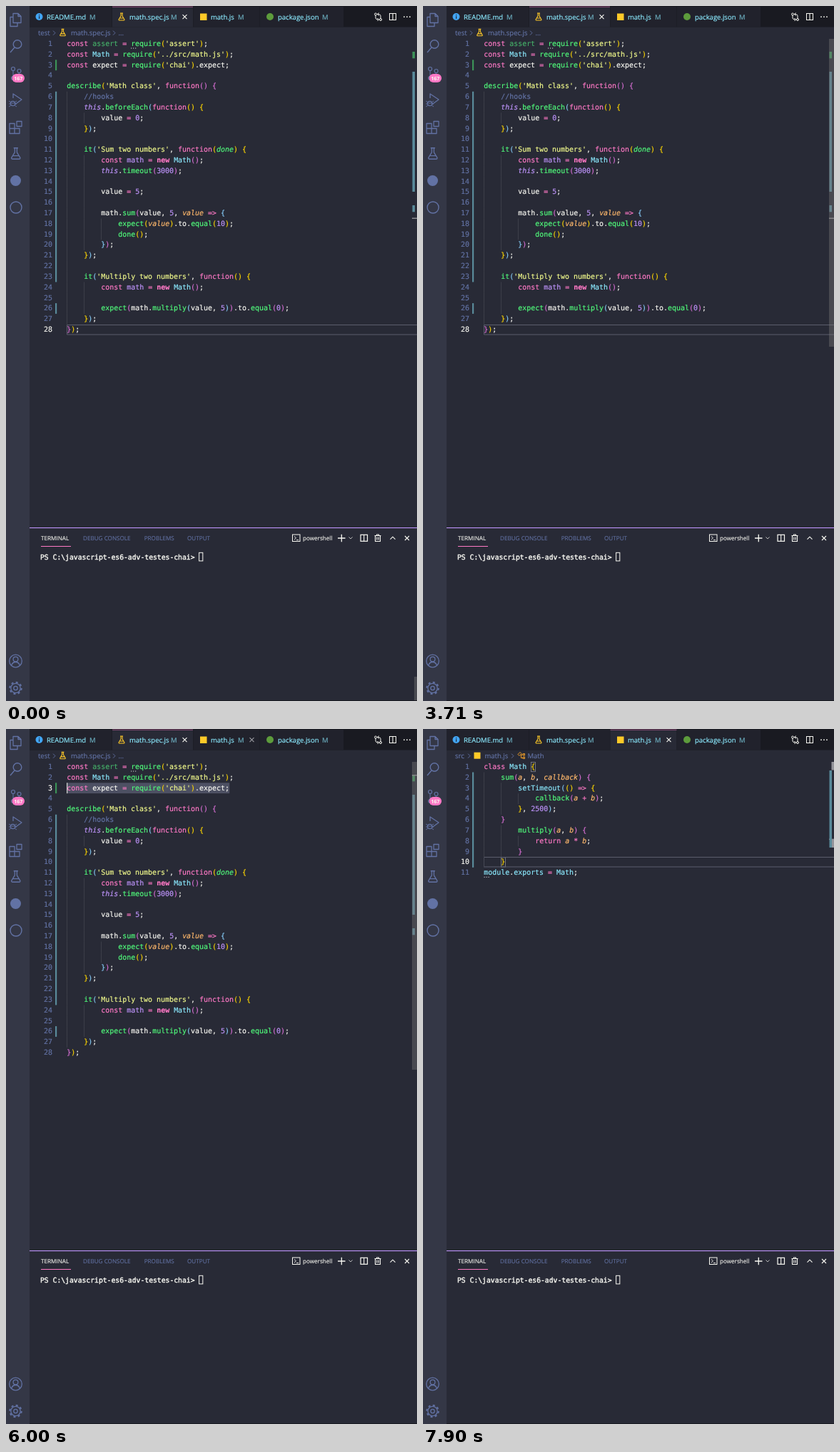
Animation, 576 px wide and 973 px high, one loop 8000 ms. Source, as an HTML page:

```html
<!DOCTYPE html>
<html lang="en">
<head>
<meta charset="utf-8">
<title>Editor session</title>
<style>
html, body { margin: 0; width: 100%; height: 100%; overflow: hidden; background: #282a36; }
svg { display: block; width: 576px; height: 973px; }
text { white-space: pre; fill: currentColor; stroke: currentColor; stroke-width: .18px; text-rendering: geometricPrecision; }
tspan { fill: currentColor; stroke: currentColor; }
.code { font: 9.966px "DejaVu Sans Mono", monospace; }
.term { font: 9.73px "DejaVu Sans Mono", monospace; stroke-width: .4px; }
.ui { font: 9.5px "Open Sans", sans-serif; }
.small { font: 8.13px "Open Sans", sans-serif; stroke-width: .1px; }
.tiny { font: bold 7px "Open Sans", sans-serif; stroke-width: 0; }
.i { font-style: italic; }
.b { font-weight: bold; }
</style>
</head>
<body>
<svg id="stage" viewBox="0 0 576 973"></svg>
<script>
const C = {
  fg: '#f8f8f2', muted: '#6272a4', pink: '#ff79c6', green: '#50fa7b', cyan: '#8be9fd',
  purple: '#bd93f9', yellow: '#f1fa8c', orange: '#ffb86c', amber: '#ffca28',
  bg: '#282a36', dark: '#191a21', tab: '#21222c', side: '#343746',
  changed: '#598a9a', added: '#3c9258', guide: '#42444f', edge: '#5b5d6c', slider: '#797979'
};
const BRACKETS = ['#ffd700', '#da70d6', '#87cefa'];
const DURATION = 8000, LEFT = 85.2, CHAR = 6, ROW = 14.815, TOP = 45.7;

const specSource = `const assert = require('assert');
const Math = require('../src/math.js');
const expect = require('chai').expect;

describe('Math class', function() {
    //hooks
    this.beforeEach(function() {
        value = 0;
    });

    it('Sum two numbers', function(done) {
        const math = new Math();
        this.timeout(3000);

        value = 5;

        math.sum(value, 5, value => {
            expect(value).to.equal(10);
            done();
        });
    });

    it('Multiply two numbers', function() {
        const math = new Math();

        expect(math.multiply(value, 5)).to.equal(0);
    });
});`;
const mathSource = `class Math {
    sum(a, b, callback) {
        setTimeout(() => {
            callback(a + b);
        }, 2500);
    }
        multiply(a, b) {
            return a * b;
        }
    }
module.exports = Math;`;

// Markup helpers
const rect = (x, y, w, h, fill, more = '') => `<rect x="${x}" y="${y}" width="${w}" height="${h}" fill="${fill}" ${more}/>`;
const box = (x, y, w, h, color, width = 1) => rect(x, y, w, h, 'none', `stroke="${color}" stroke-width="${width}"`);
const disc = (x, y, r, fill) => `<circle cx="${x}" cy="${y}" r="${r}" fill="${fill}"/>`;
const ring = (x, y, r, color, width = 1.2, dash = '') =>
  `<circle cx="${x}" cy="${y}" r="${r}" fill="none" stroke="${color}" stroke-width="${width}" stroke-dasharray="${dash}"/>`;
const path = (d, color, width = 1.1, fill = 'none') =>
  `<path d="${d}" fill="${fill}" stroke="${color}" stroke-width="${width}" stroke-linejoin="round"/>`;
const text = (x, y, s, color, cls = 'ui', more = '') => `<text x="${x}" y="${y}" class="${cls}" color="${color}" ${more}>${s}</text>`;
const group = (id, ...parts) => `<g id="${id}">${parts.join('')}</g>`;
const cross = (x, y, color = C.fg) => path(`M${x - 3} ${y - 3}l6 6m0-6l-6 6`, color);
const chevronRight = (x, y) => path(`M${x - 1.5} ${y - 3}l3 3l-3 3`, C.muted, .9);
const chevronDown = (x, y, r = 3) => path(`M${x - r} ${y - r / 2}l${r} ${r}l${r} ${-r}`, '#c5c5c5', 1);
const flask = (x, y, k, color, width) =>
  path(`M${x - 2 * k} ${y - 5 * k}h${4 * k}m${-k} 0v${4 * k}l${3 * k} ${5 * k}q0 ${k} ${-k} ${k}h${-6 * k}q${-k} 0 ${-k} ${-k}l${3 * k} ${-5 * k}v${-4 * k}M${x - 2.5 * k} ${y + 2 * k}h${5 * k}`, color, width);
const rowTop = n => TOP + (n - 1) * ROW;
const baseline = n => 56 + (n - 1) * ROW;

// Syntax colours
function wordStyle(word, before, after) {
  if (/^(const|function|class|return)$/.test(word)) return [C.pink];
  if (word === 'new') return [C.pink, 'b'];
  if (word === 'this') return [C.purple, 'i'];
  if (/^\d/.test(word)) return [C.purple];
  if (/^(Math|setTimeout|module|exports)$/.test(word)) return [C.cyan];
  if (after[0] === '(') return [C.green];
  if (before.endsWith('function(')) return [C.green, 'i'];
  if (/^(a|b|callback)$/.test(word)) return [C.orange, 'i'];
  if (word === 'value' && (after.startsWith(' =>') || before.endsWith('expect('))) return [C.orange, 'i'];
  if (before.endsWith('const ')) {
    if (word === 'assert') return ['#45ad68'];
    if (word === 'math') return [C.purple];
  }
  return [C.fg];
}

function codeLines(source) {
  let depth = 0;
  const lines = source.split('\n');
  const indentOf = n => lines[n].search(/\S/);
  return lines.map((line, n) => {
    const indent = line ? indentOf(n) : indentOf(n + 1);
    let out = '';
    for (let level = 0; level < indent; level += 4)
      out += rect(LEFT + level * CHAR, rowTop(n + 1), .8, ROW + .1, C.guide);
    const spans = line.trim().replace(/\/\/.*|'[^']*'|\w+|=>|[^\w\s]|\s+/g, (token, at, all) => {
      let style = [C.fg];
      if (token.startsWith('//')) style = [C.muted];
      else if (token[0] === "'") style = [C.yellow];
      else if (/\w/.test(token)) style = wordStyle(token, all.slice(0, at), all.slice(at + token.length));
      else if (/[({]/.test(token)) style = [BRACKETS[depth++ % 3]];
      else if (/[)}]/.test(token)) style = [BRACKETS[--depth % 3]];
      else if (/[=+*]/.test(token)) style = [C.pink];
      else if (!token.trim()) return token;
      return `<tspan color="${style[0]}" class="${style[1] || ''}">${token}</tspan>`;
    });
    return out + text(LEFT + indent * CHAR, baseline(n + 1), spans, C.fg, 'code') + lineNumber(n + 1, C.muted);
  }).join('');
}

const lineNumber = (n, color) => text(65, baseline(n), n, color, 'code', 'text-anchor="end"');
const activeNumber = n => rect(50, rowTop(n) + 1, 16, ROW - 2, C.bg) + lineNumber(n, C.fg);
const gutterBar = (from, to, color) => rect(69, rowTop(from), 2.2, (to - from + 1) * ROW, color);
const hintDots = (x, y) => [0, 3, 6].map(d => rect(x + d, y, 1.2, 1.2, '#b9bac0')).join('');
const lineBox = n => path(`M576 ${Math.round(rowTop(n)) + .5}H85.5v13.5H576`, C.edge, 1);
const bracketBox = (col, n) => box(LEFT + col * CHAR + .3, rowTop(n) + .8, CHAR, 13.2, '#85878f', .8);

// Window chrome
function activityBar() {
  const m = C.muted;
  return rect(0, 0, 33, 973, C.side)
    + path('M10 10.5h7l4 4v9h-11zM10 15.5h-4v13h10v-5M17 10.5v4h4', m, 1.3)
    + ring(16, 53.5, 5.8, m, 1.4) + path('M12 58l-6 7', m, 1.4)
    + ring(10, 88, 2.5, m) + ring(18.5, 91, 2.5, m) + ring(10, 101, 2.5, m) + path('M10 90.5v8M18.5 93.5q0 4-8 4', m)
    + rect(8.5, 95, 17.5, 12, C.pink, 'rx="6"') + text(17.2, 103.6, '167', C.fg, 'tiny', 'text-anchor="middle"')
    + path('M10 129v-6l12 8l-9 6.500', m, 1.3) + ring(9.5, 136.5, 3.2, m)
    + path('M4 133l3 2M4 137h2.5M4 141l3-2M15 133l-3 2M15 137h-2.5M15 141l-3-2M6.500 136h6', m, .9)
    + path('M5 164.500h7v7h7v7h-14zM5 171.500h7v7M15 161.500h7v7h-7z', m, 1.3)
    + flask(13.8, 206.5, 1.55, m, 1.3)
    + disc(13.5, 244.5, 7.5, m) + ring(14, 282, 8, m, 1.4)
    + ring(13.5, 917, 8.8, m, 1.3) + ring(13.5, 914.5, 3.4, m, 1.3) + path('M7.500 923.500q1.500-5 6-5t6 5', m, 1.3)
    + ring(13.5, 955, 6.7, m, 1.3) + ring(13.5, 955, 8.2, m, 2, '3 3.44') + ring(13.5, 955, 2.7, m, 1.3);
}

function tabBar(active) {
  const tabs = [[33, 115.5, 57, 'README.md', 117], [149, 113, 173, 'math.spec.js', 231],
                [262.5, 93, 287, 'math.js', 325], [356, 117, 381, 'package.json', 443]];
  return rect(33, 0, 543, 29.5, C.dark)
    + tabs.map(([x, w, nameX, name, markX], n) =>
        rect(x, 1, w, 28.5, n === active ? C.bg : C.tab)
        + (n === active ? rect(x, .7, w, 1, '#94527e') : '')
        + text(nameX, 18.7, name, C.cyan)
        + text(markX, 18.7, 'M', C.cyan, 'ui', 'opacity=".7"')).join('')
    + disc(46.5, 15, 5, '#42a5f5') + rect(46, 14.2, 1.1, 3.6, C.tab) + rect(46, 12, 1.1, 1.2, C.tab)
    + flask(162, 15, 1, C.amber, 1.1)
    + rect(272, 10.5, 9.500, 9.500, C.amber)
    + disc(370, 15, 5, '#5d9c3c')
    + ring(518, 11.5, 1.5, C.fg, 1) + ring(525, 19, 1.5, C.fg, 1)
    + path('M518 13v4q0 2 4 2M520.500 17l2 2l-2 2M525 17.500v-4q0-2-4-2M522.500 9.500l-2 2l2 2', C.fg, 1)
    + box(537.5, 10.5, 9, 9, C.fg) + path('M542 10.500v9', C.fg)
    + [558, 562, 566].map(x => disc(x, 15.2, .9, C.fg)).join('');
}

function panel() {
  return rect(33, 730, 543, 1.1, C.purple)
    + text(49, 747.7, 'TERMINAL', C.fg, 'small') + rect(49, 756, 42, 1, C.pink)
    + text(108, 747.7, 'DEBUG CONSOLE', C.muted, 'small')
    + text(193.7, 747.7, 'PROBLEMS', C.muted, 'small')
    + text(254, 747.7, 'OUTPUT', C.muted, 'small')
    + box(401.5, 740, 10.5, 9.5, C.fg) + path('M404 742.500l2.500 2.300l-2.500 2.300M407 747.500h3', C.fg, .9)
    + text(416, 747.9, 'powershell', C.fg, 'small')
    + path('M465 745h10.500M470.300 739.700v10.600', C.fg, 1.3) + chevronDown(483, 744.7, 2.5)
    + box(497, 740.3, 9.500, 9, C.fg, 1.2) + path('M501.700 740v9.500', C.fg)
    + path('M516.500 741.500h9M519.500 741.500v-1.500h3v1.500M517.500 741.500v8h7v-8M519.800 743.500v4M522.200 743.500v4', C.fg, 1.1)
    + path('M538.500 746.700l3.500-3.500l3.500 3.500', C.fg) + cross(562, 745)
    + text(48, 775, 'PS C:\\javascript-es6-adv-testes-chai>', C.fg, 'term')
    + box(270.6, 765.3, 5.2, 11.6, C.fg)
    + rect(33, 972, 543, 1, C.dark);
}

const specView = () => group('spec',
  tabBar(1), cross(250.5, 15.2),
  text(45, 41, 'test', C.muted), chevronRight(67.5, 37.7), flask(79.5, 37, .95, C.amber, 1.1),
  text(91, 41, 'math.spec.js', C.muted), chevronRight(151.5, 37.7), text(157.5, 41, '...', C.muted),
  group('selection', rect(LEFT, rowTop(3), 38 * CHAR, ROW, '#4d5063')),
  codeLines(specSource), hintDots(175, 58.5),
  gutterBar(3, 3, C.added), gutterBar(6, 23, C.changed), gutterBar(26, 26, C.changed),
  rect(569.5, 64, 3.5, 9.3, C.added), rect(569.5, 92, 3.5, 168, C.changed), rect(569.5, 279, 3.5, 9.3, C.changed),
  group('atEnd', lineBox(28), activeNumber(28), rect(569, 296.5, 7, 1.5, '#8d8e93')),
  group('atImport', activeNumber(3), rect(LEFT, rowTop(3), 1, ROW, C.fg), rect(569, 64, 7, 1.5, '#8d8e93')),
  group('folds', ...[5, 7, 11, 17, 23].map(n => chevronDown(76.5, rowTop(n) + 7, 3.4))),
  group('slider', rect(569, 46, 7, 431, C.slider, 'fill-opacity=".4"')),
  group('hoverClose', cross(344.5, 15.2, '#9a9ba0')),
  group('tooltip', rect(311.5, 24.5, 201, 15, '#2b2b2b', 'stroke="#6a6a6a" stroke-width=".8"'),
    text(316, 35.2, 'C:\\javascript-es6-adv-testes-chai\\src\\math.js', C.fg, 'small'))
);

const mathView = () => group('math',
  tabBar(2), cross(344.5, 15.2),
  text(45, 41, 'src', C.muted), chevronRight(64.5, 37.7), rect(71.5, 32.7, 9, 9, C.amber), text(86.5, 41, 'math.js', C.muted),
  group('symbol', chevronRight(125.5, 37.7),
    path('M133 35.500l3-3l2 2l-3 3zM137 36h3M137.500 36v4.500h2.500', '#ee9d28', 1),
    box(140.3, 34.6, 2.2, 2.2, '#ee9d28'), box(140.3, 39.2, 2.2, 2.2, '#ee9d28'),
    text(146.5, 41, 'Math', C.muted),
    rect(572.5, 46, 3.5, 11.5, '#93949a'), rect(572.5, 154, 3.5, 12, '#93949a'),
    bracketBox(11, 1), bracketBox(4, 10)),
  lineBox(10), codeLines(mathSource), activeNumber(10), hintDots(85.5, 206.8),
  rect(569, 153.7, 7, 1.4, '#8d8e93'),
  group('mathChanges', gutterBar(2, 10, C.changed), rect(569.5, 58, 3.5, 108, C.changed)),
  group('caret', rect(115.2, 179.5, 1.3, 14.2, C.fg))
);

const stage = document.getElementById('stage');
stage.innerHTML = rect(0, 0, 576, 973, C.bg) + specView() + mathView() + activityBar() + panel()
  + group('termSlider', rect(572, 939, 4, 33, C.slider, 'fill-opacity=".4"'));

// Opacity steps: [time, value], each held until the next
const tracks = {
  spec: [[0, 1], [6360, 0]],
  math: [[0, 0], [6360, 1]],
  slider: [[0, 0], [260, .5], [330, 1], [2570, 0], [3710, 1]],
  termSlider: [[0, 1], [740, 0]],
  atEnd: [[0, 1], [4420, 0]],
  atImport: [[0, 0], [4420, 1]],
  selection: [[0, 0], [4420, 1]],
  hoverClose: [[0, 0], [2170, 1], [3510, 0], [6000, 1]],
  tooltip: [[0, 0], [3180, 1], [3380, .5], [3510, 0]],
  folds: [[0, 0], [4690, .15], [4760, .35], [4830, .6], [4900, .8], [4960, .9], [5030, 1],
          [5660, .85], [5730, .6], [5800, .4], [5860, .2], [5930, 0]],
  symbol: [[0, 0], [6430, 1]],
  mathChanges: [[0, 0], [7110, 1]],
  caret: [[0, 1], [6840, 0], [7370, 1], [7900, 0]]
};
const players = Object.entries(tracks).map(([id, steps]) => [document.getElementById(id), steps]);

function draw(now) {
  const t = now % DURATION;
  for (const [el, steps] of players) {
    const value = steps.findLast(([start]) => start <= t)[1];
    el.style.opacity = value;
    el.style.visibility = value ? 'inherit' : 'hidden';
  }
}
function tick() {
  draw(performance.now());
  requestAnimationFrame(tick);
}
tick();
</script>
</body>
</html>
```
